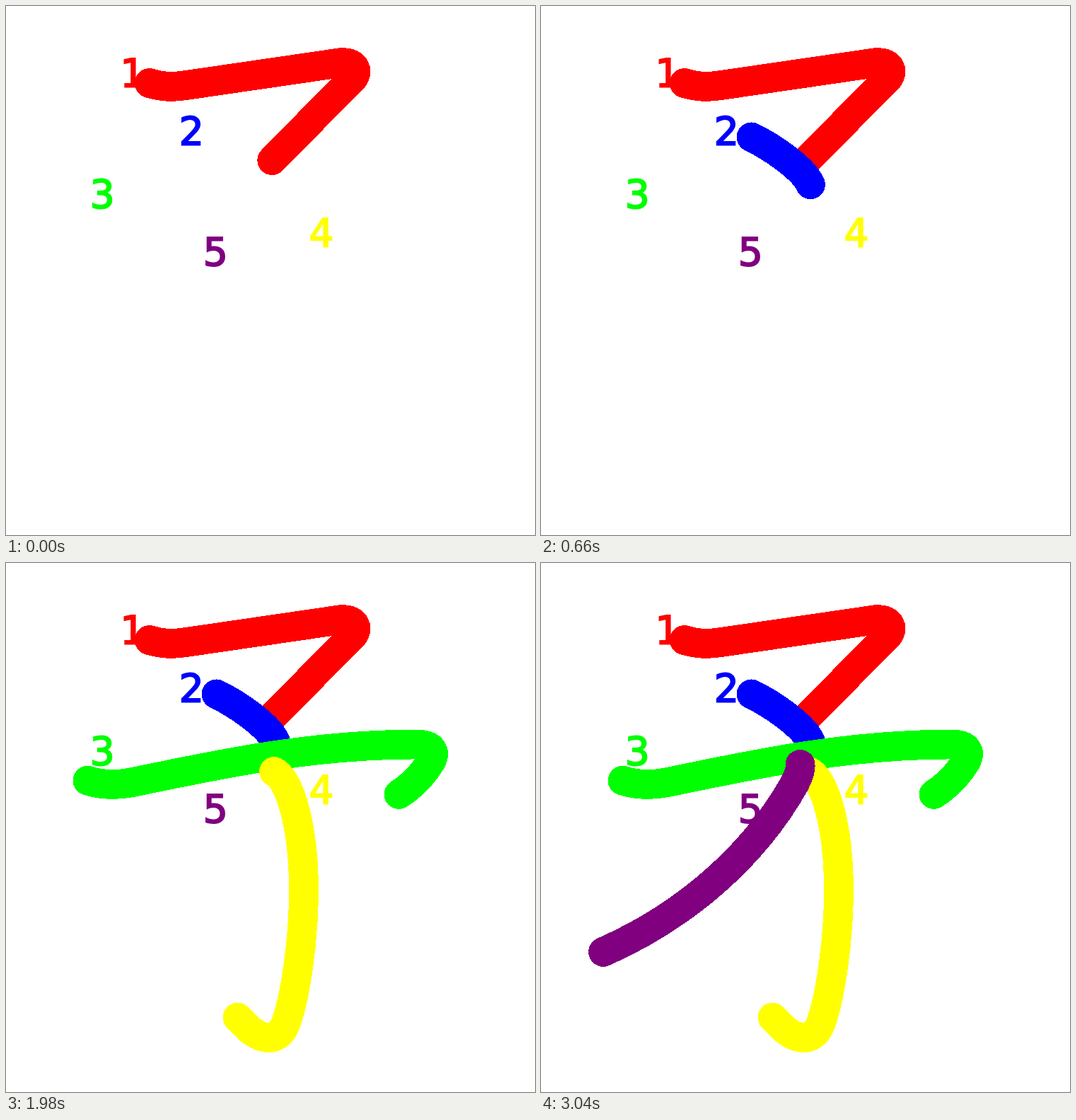
These frames come from a looping animation (748 px wide and 748 px high, 3300 ms). An HTML page:

```html
<!DOCTYPE html>
<html>
<head>
<meta charset="utf-8">
<style>
  html, body { margin: 0; height: 100%; overflow: hidden; background: #fff; }
  svg { display: block; width: 748px; height: 748px; }
  path { fill: none; stroke-width: 41.8; stroke-linecap: round; stroke-linejoin: round; shape-rendering: crispEdges; }
  text { font: 55px "DejaVu Sans", sans-serif; stroke-width: 2; }
</style>
</head>
<body>
<svg id="stage" viewBox="0 0 748 748"></svg>
<script>
const STEP = 660;

// Each brush stroke: colour, label position, path
const strokes = [
  ['red', 161.5, 114,
    'M202.7 109C220 114 233 115.2 252 112.4L469 80.8C494 76.3 504.3 94 482.4 110.3L376.2 218.2'],
  ['blue', 244.7, 195.6,
    'M297.5 185.4C328 200 372 231 381 252.4'],
  ['lime', 118.8, 285.2,
    'M115.5 307.6C134 314 158 314.5 179 310C300 285 430 256.5 580 256.5C604 256.5 610 268 598 285C588 300 573 316 555.5 327'],
  ['yellow', 428.4, 339.6,
    'M379 295C402 306 421 375 421 462C421 535 409 613 396 650C386 677 365 675.5 345 660C338 654 333 648 327.5 642.6'],
  ['purple', 278.8, 367.4,
    'M366.5 284.8C367.5 291 365 300 358 313C302 412 206 498 88 550']
];

const stage = document.getElementById('stage');
stage.innerHTML =
  strokes.map(([color, x, y], i) => `<text x="${x}" y="${y}" fill="${color}" stroke="${color}">${i + 1}</text>`).join('') +
  strokes.map(([color, , , d]) => `<path d="${d}" stroke="${color}"/>`).join('');
const paths = stage.querySelectorAll('path');

const start = performance.now();
function draw() {
  const elapsed = performance.now() - start;
  const current = Math.floor(elapsed / STEP) % strokes.length;
  paths.forEach((path, i) => path.style.display = i <= current ? '' : 'none');
  requestAnimationFrame(draw);
}
draw();
</script>
</body>
</html>
```
